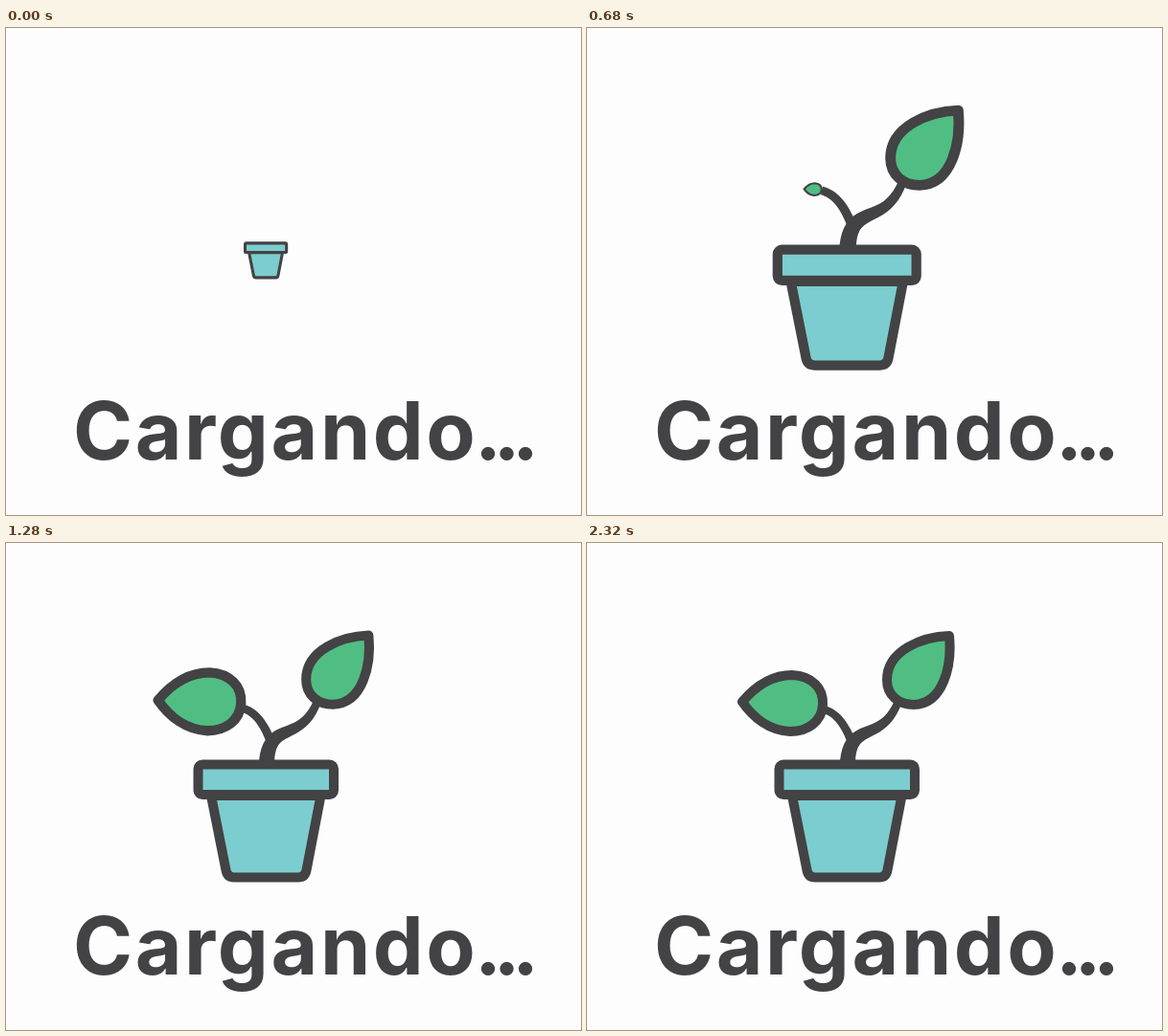
Animation, 600 px wide and 509 px high, one loop 2.36 s. Source, as an HTML page:

```html
<!DOCTYPE html>
<html lang="es">
<head>
<meta charset="utf-8">
<title>Cargando...</title>
<style>
  html, body { margin: 0; width: 100%; height: 100%; overflow: hidden; background: #fefdfe; }
  svg { display: block; width: 600px; height: 509px; }
  text { font: 700 84px Inter, "Open Sans", sans-serif; fill: #434244; letter-spacing: 2.6px; }
  .dots { letter-spacing: -8.5px; }
  .stem { fill: #434244; }
  .leaf, .pot { stroke: #434244; stroke-width: 10; stroke-linejoin: round; }
  .leaf { fill: #50be82; }
  .pot { fill: #7ccdcf; }
</style>
</head>
<body>
<svg viewBox="0 0 600 509">
  <g id="left">
    <path id="leftStem" class="stem"/>
    <path id="leftLeaf" class="leaf" d="M162 166C178 147 195 138 214 138C235 139 247 152 246 169C245 187 230 197 212 197C190 196 173 182 162 166Z"/>
  </g>
  <g id="right">
    <path id="rightStem" class="stem"/>
    <path id="rightLeaf" class="leaf" d="M378 97C350 98 313 112 313 143C313 159 325 169 341 169C372 168 381 128 378 97Z"/>
  </g>
  <g id="pot" class="pot">
    <path d="M214 264L229.5 342Q231 349.5 238 349.5H305Q312 349.5 313.5 342L328.5 264Z"/>
    <rect x="200.5" y="231.5" width="141.5" height="31.5" rx="4.5"/>
  </g>
  <text x="70" y="451">Cargando</text>
  <text class="dots" x="489" y="451">...</text>
</svg>
<script>
const LOOP = 2360, STEP = 40, LEFT_DELAY = 400;
const PIVOT = [271, 222];

// Stem: cubic centre line with half widths at root and tip
const sprout = { line: [[270.5, 228], [272, 198], [324, 200], [303.5, 166]], root: 4.5, tip: .3 };
const grown = { line: [[272, 228], [275, 185], [308, 210], [325, 165]], root: 8, tip: 4 };
const branch = { line: [[277, 210], [270, 192], [262, 178], [247, 174]], root: 4.5, tip: 4 };

const el = id => document.getElementById(id);
const clamp = u => Math.min(1, Math.max(0, u));
const mix = (a, b, u) => a + (b - a) * u;
const mixPoint = (p, q, u) => p.map((v, i) => mix(v, q[i], u));

function backOut(u, over) {
  const v = clamp(u) - 1;
  return 1 + (over + 1) * v ** 3 + over * v * v;
}

// Shoots up past full size, then relaxes
function grow(t) {
  const peak = 480, over = .25;
  return t < peak
    ? (1 + over) * (1 - (1 - clamp(t / peak)) ** 2.3)
    : 1 + over * Math.exp((peak - t) / 190);
}

const leafSize = t => clamp((t - 240) / 200);

function bend(a, b, u) {
  return {
    line: a.line.map((p, i) => mixPoint(p, b.line[i], u)),
    root: mix(a.root, b.root, u),
    tip: mix(a.tip, b.tip, u)
  };
}

function ribbon({ line, root, tip }) {
  const sideA = [], sideB = [], n = 20;
  for (let i = 0; i <= n; i++) {
    const u = i / n;
    let pts = line;
    while (pts.length > 2) pts = pts.slice(1).map((p, k) => mixPoint(pts[k], p, u));
    const [[x0, y0], [x1, y1]] = pts;
    const [x, y] = mixPoint(pts[0], pts[1], u);
    const k = mix(root, tip, u) / Math.hypot(x1 - x0, y1 - y0);
    const nx = (y0 - y1) * k, ny = (x1 - x0) * k;
    sideA.push([x + nx, y + ny]);
    sideB.unshift([x - nx, y - ny]);
  }
  return `M${sideA.concat(sideB).join("L")}Z`;
}

function scale(id, s, [x, y] = PIVOT) {
  const node = el(id);
  node.style.visibility = s > 0 ? "inherit" : "hidden";
  node.setAttribute("transform", `translate(${x} ${y}) scale(${s}) translate(${-x} ${-y})`);
}

function draw(t) {
  const late = t - LEFT_DELAY;
  scale("pot", mix(.305, 1, backOut(t / 880, 1.15)));
  scale("right", grow(t));
  scale("rightLeaf", leafSize(t), [324, 167]);
  el("rightStem").setAttribute("d", ribbon(bend(sprout, grown, clamp((t - 240) / 160))));
  scale("left", grow(late));
  scale("leftLeaf", leafSize(late), [247, 174]);
}

el("leftStem").setAttribute("d", ribbon(branch));
const start = performance.now();
function tick() {
  const t = (performance.now() - start) % LOOP;
  draw(Math.floor(t / STEP) * STEP);
  requestAnimationFrame(tick);
}
tick();
</script>
</body>
</html>
```
